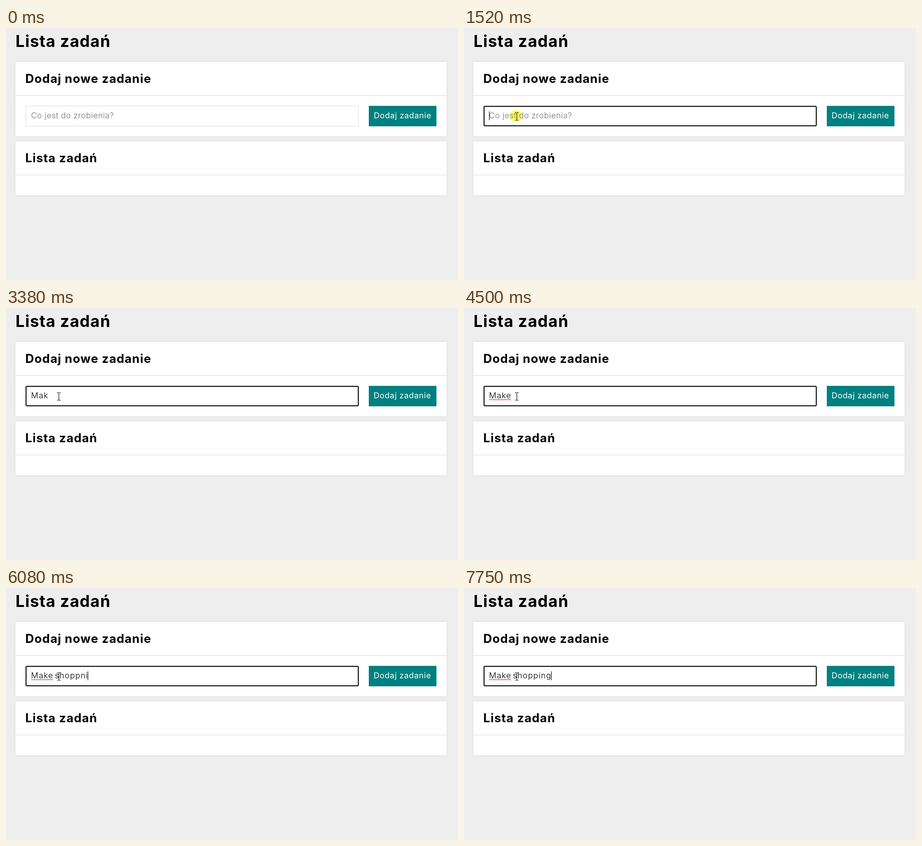
Animation of 902 by 505 pixels, one loop 8000 ms. Source, as an HTML page:

```html
<!DOCTYPE html>
<html lang="pl">
<head>
<meta charset="utf-8">
<title>Lista zadań</title>
<style>
  html, body { margin: 0; width: 100%; height: 100%; overflow: hidden; background: #eee; }
  svg { display: block; width: 100vw; height: 100vh; }
  text { font: 400 16px Inter, "Open Sans", sans-serif; white-space: pre; }
  .title { font-size: 32px; font-weight: 700; letter-spacing: .033em; }
  .head { font-size: 24px; font-weight: 700; letter-spacing: .038em; }
  .card { fill: #fff; filter: drop-shadow(0 0 2px #ddd); }
  .rule { fill: #ddd; }
  .button { fill: #fff; letter-spacing: .035em; }
  .hint { fill: #757575; font-weight: 300; letter-spacing: .028em; }
  .typed { font-weight: 300; letter-spacing: .062em; }
  .glow { fill: #ffff66; mix-blend-mode: multiply; }
</style>
</head>
<body>
<svg viewBox="0 0 902 505">
  <rect width="902" height="505" fill="#eee"/>
  <text class="title" x="19" y="38">Lista zadań</text>

  <rect class="card" x="19" y="68" width="860" height="149"/>
  <rect class="rule" x="19" y="135" width="860" height="1"/>
  <text class="head" x="38.5" y="110">Dodaj nowe zadanie</text>

  <rect class="card" x="19" y="227" width="860" height="108"/>
  <rect class="rule" x="19" y="294" width="860" height="1"/>
  <text class="head" x="38.5" y="269">Lista zadań</text>

  <rect id="field" fill="#fff"/>
  <rect x="724" y="156" width="135" height="41" fill="#008080"/>
  <text id="button" class="button" x="734" y="181">Dodaj zadanie</text>

  <text id="hint" class="hint" x="50" y="181">Co jest do zrobienia?</text>
  <text id="verb" class="typed" x="50" y="181"></text>
  <text id="noun" class="typed" x="97.5" y="181"></text>
  <path id="squiggle" fill="none" stroke="#e00000" stroke-width="1"/>
  <rect id="caret" y="167" width="1" height="18"/>

  <circle id="glow" class="glow" cx="103.5" cy="176" r="12"/>
  <path id="arrow" d="M.5 .5V16.5L4.2 13L6.7 18.5L9 17.5L6.6 12H11.5Z" fill="#fff" stroke="#000"/>
  <path id="beam" d="M-3 .5H-1L.5 1.5L2 .5H4M.5 1.5V15M-3 16H-1L.5 15L2 16H4" fill="none" stroke="#000"/>
</svg>
<script>
const LOOP = 8000, FOCUS = 1520, LEFT = 50;
const $ = id => document.getElementById(id);
const set = (id, attrs) => {
  for (const key in attrs) $(id).setAttribute(key, attrs[key]);
};
const show = (id, on) => set(id, { visibility: on ? 'visible' : 'hidden' });

const advance = { M: 15, a: 9, k: 10, e: 9, ' ': 4, s: 8, h: 11, o: 10, p: 11, n: 11, i: 4, g: 11 };

// time, field text, caret visible
const typing = [
  [0, '', false], [FOCUS, '', true], [2050, '', false],
  [2440, 'M', true], [2700, 'Ma', true], [2840, 'Mak', true], [3380, 'Mak', false],
  [3780, 'Make', true], [3910, 'Make ', true], [4500, 'Make ', false], [4960, 'Make ', true],
  [5160, 'Make s', true], [5290, 'Make sh', true], [5480, 'Make sho', true],
  [5750, 'Make shop', true], [5810, 'Make shopp', true],
  [6010, 'Make shoppn', true], [6080, 'Make shoppni', true],
  [6560, 'Make shoppn', true], [6690, 'Make shopp', false],
  [6880, 'Make shoppi', true], [6950, 'Make shoppin', true], [7480, 'Make shoppin', false],
  [7750, 'Make shopping', true]
];

// time, x, y, shape
const pointer = [
  [0, 0, 0, ''], [1190, 13, 250, 'arrow'], [1260, 52, 210, 'arrow'],
  [1320, 88, 173, 'beam'], [1390, 105, 169, 'beam']
];

const at = (steps, t) => steps.findLast(step => step[0] <= t);

let wave = `M${LEFT} 184.5`;
for (let i = 1; i <= 22; i++) wave += `L${LEFT + i * 2} ${i % 2 ? 183 : 184.5}`;
set('squiggle', { d: wave });

function render(t) {
  const focused = t >= FOCUS;
  set('field', focused
    ? { x: 40, y: 157, width: 663, height: 39, rx: 2, stroke: '#101010', 'stroke-width': 2 }
    : { x: 39.5, y: 156.5, width: 664, height: 40, rx: 0, stroke: '#ddd', 'stroke-width': 1 });
  set('button', { x: focused ? 733.5 : 734, 'font-weight': 400 });

  const [, text, caretOn] = at(typing, t);
  const [verb, noun = ''] = text.split(' ');
  $('verb').textContent = verb;
  $('noun').textContent = noun;
  show('hint', !text);
  show('squiggle', t >= 3910);
  show('caret', caretOn);
  set('caret', { x: [...text].reduce((x, c) => x + advance[c], LEFT) });

  const [, x, y, shape] = at(pointer, t);
  for (const id of ['arrow', 'beam']) {
    show(id, id === shape);
    set(id, { transform: `translate(${x} ${y})` });
  }
  show('glow', focused && t < 1590);
}

const start = performance.now();
function tick() {
  render((performance.now() - start) % LOOP);
  requestAnimationFrame(tick);
}
tick();
</script>
</body>
</html>
```
